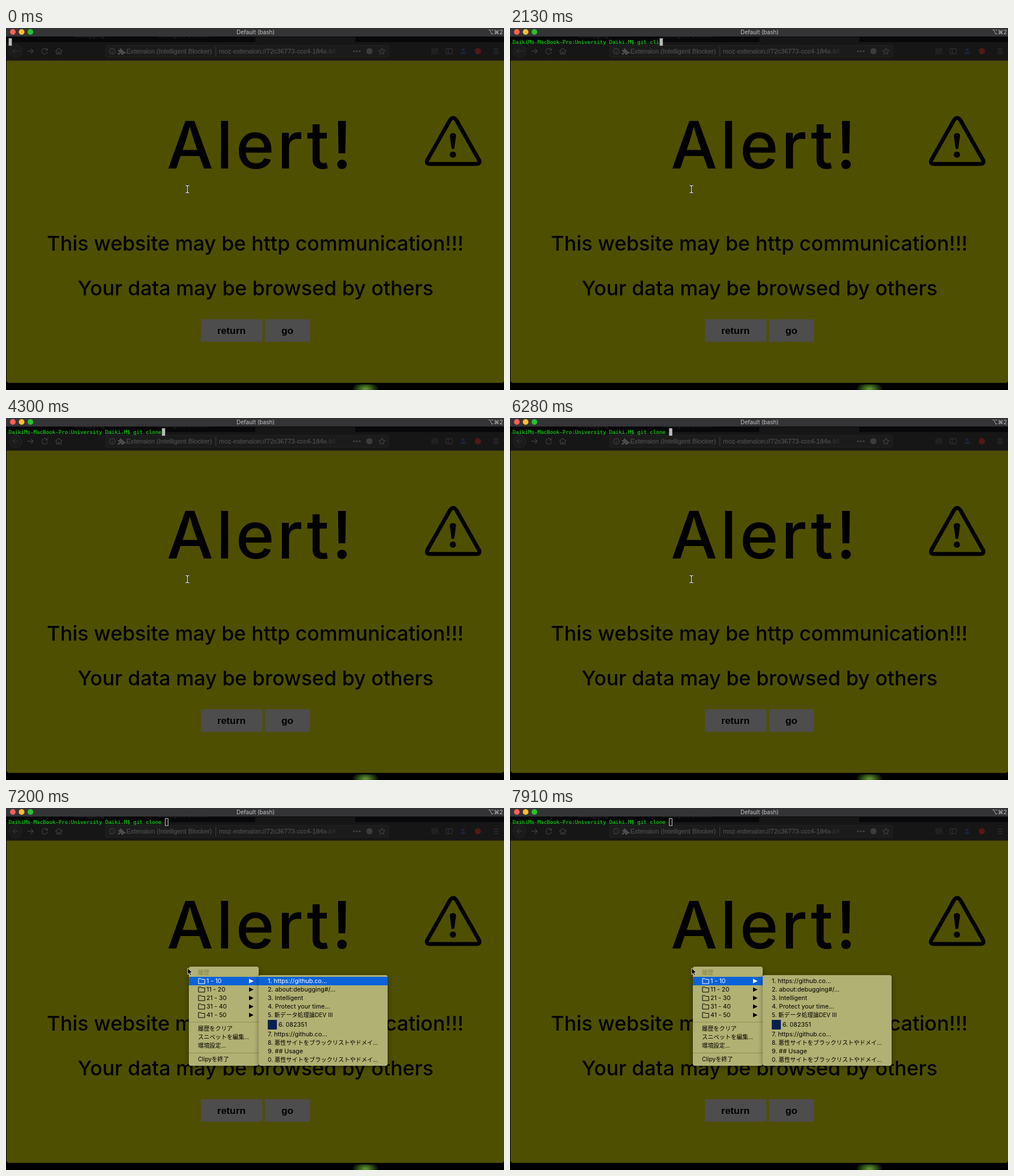
An HTML page that plays this animation: 877x639 px, repeating every 8000 ms.

```html
<!DOCTYPE html>
<html lang="en">
<head>
<meta charset="utf-8">
<title>Terminal over warning page</title>
<style>
  html, body { margin: 0; width: 100%; height: 100%; overflow: hidden; background: #000; }
  svg { display: block; width: 100%; height: 100%; }
  text { white-space: pre; }
  .page { font-family: Inter, sans-serif; font-weight: 500; font-optical-sizing: none; text-anchor: middle; }
  .button { font: bold 17.3px "Liberation Sans", sans-serif; text-anchor: middle; }
  .bar { font: 11.4px "Liberation Sans", sans-serif; fill: #4c4c4e; stroke: #4c4c4e; stroke-width: .3; }
  .tab { fill: #242426; stroke: none; }
  .icon { fill: none; stroke: #3c3c3e; stroke-width: 1.3; stroke-linecap: round; stroke-linejoin: round; }
  .faint { stroke: #2e2e30; }
  .title { font: 10px Inter, sans-serif; fill: #c4c4c4; }
  .shell { font: 9.15px "DejaVu Sans Mono", monospace; fill: #10c810; stroke: #10c810; stroke-width: .2; }
  .menu { font: 10.8px Inter, "Noto Sans CJK JP", "Noto Sans CJK", sans-serif; }
  .menu .ja { font-size: 10.2px; }
  .panel { fill: #b1b173; filter: drop-shadow(0 2px 4px rgba(0, 0, 0, .4)); }
</style>
</head>
<body>
<svg viewBox="0 0 877 639" xmlns="http://www.w3.org/2000/svg">
  <defs>
    <radialGradient id="glow">
      <stop offset="0" stop-color="#6a9a3c"/>
      <stop offset=".5" stop-color="#2f5216"/>
      <stop offset="1" stop-color="#000"/>
    </radialGradient>
    <linearGradient id="fade">
      <stop offset="0" stop-color="#1b1b1c" stop-opacity="0"/>
      <stop offset="1" stop-color="#1b1b1c"/>
    </linearGradient>
  </defs>

  <!-- dimmed browser -->
  <rect width="877" height="639" fill="#000"/>
  <ellipse cx="633" cy="637" rx="24" ry="13" fill="url(#glow)"/>
  <rect x="1" y="14" width="876" height="12" fill="#08080a"/>
  <text class="bar tab" x="120" y="17">debugging</text>
  <text class="bar tab" x="268" y="17">Intelligent Blocker</text>
  <rect x="439" y="16" width="176" height="10" fill="#161617"/>
  <rect x="1" y="25" width="876" height="33" fill="#161617"/>
  <rect x="1" y="620" width="876" height="9" fill="#000"/>
  <path d="M1 57.500H877V622q0 4.500-5 4.500H6q-5 0-5-4.500z" fill="#4f4f00"/>

  <rect x="175.500" y="30.500" width="498" height="21" rx="2" fill="#1b1b1c" stroke="#222224"/>
  <circle cx="17" cy="41" r="11.500" fill="#1b1b1c" stroke="#242426"/>
  <g class="icon">
    <path class="faint" d="M22 41H12m4-4-4 4 4 4"/>
    <path d="M38 41h10m-4-4 4 4-4 4"/>
    <path d="M72 38a5 5 0 1 0 1 4M73 36v3h-3"/>
    <path d="M87 41l6-5 6 5M89 41v5h3v-3h2v3h3v-5"/>
    <circle cx="187" cy="41" r="5"/>
    <path d="M187 40.500v3M187 38v.1M369.500 34v15"/>
    <path d="M662 35.500l1.700 3.600 4 .5-3 2.700.8 4-3.500-2-3.500 2 .8-4-3-2.700 4-.5z"/>
    <path class="faint" d="M750.500 36v10M753.500 36v10M756.500 36v10M758.500 36l3 10"/>
    <rect class="faint" x="775" y="36.500" width="11" height="9" rx="1"/>
    <path class="faint" d="M779 37v8M859 37h8M859 41h8M859 45h8"/>
  </g>
  <path d="M197 39h3v-1a2 2 0 1 1 4 0v1h3v3h1a1.800 1.800 0 1 1 0 3h-1v2h-4v-1a1.500 1.500 0 0 0-3 0v1h-3v-3h1a1.500 1.500 0 0 0 0-3h-1z" fill="#4c4c4e"/>
  <text class="bar" x="212" y="45">Extension (Intelligent Blocker)</text>
  <text class="bar" x="375" y="45">moz-extension://72c36773-ccc4-184a-b8</text>
  <rect x="555" y="33" width="32" height="16" fill="url(#fade)"/>
  <g fill="#4c4c4e">
    <circle cx="613" cy="41" r="1.500"/><circle cx="618" cy="41" r="1.500"/><circle cx="623" cy="41" r="1.500"/>
    <circle cx="640" cy="41" r="5.500" fill="#3c3c3e"/>
  </g>
  <g fill="#1a2438"><circle cx="805" cy="38.500" r="2.800"/><path d="M800 46q0-4 5-4t5 4z"/></g>
  <circle cx="831" cy="41" r="5.500" fill="#541816"/>

  <text class="page" x="283" y="248" font-size="116" letter-spacing="5" style="text-anchor:start">Alert!</text>
  <text class="page" x="439" y="392.500" font-size="35.800">This website may be http communication!!!</text>
  <text class="page" x="439.500" y="471.500" font-size="35.800">Your data may be browsed by others</text>
  <path d="M782 162.500Q787.500 155 793 162.500L833 233Q836 240 828 240H747Q739 240 742 233z" fill="none" stroke="#000" stroke-width="7"/>
  <path d="M781.500 190q0-4.500 5.500-4.500t5.500 4.500l-3 22.500q-2.500 2.500-5 0z"/>
  <circle cx="787" cy="223.500" r="5.500"/>
  <g fill="#4d4d4d" stroke="#4e4e3e">
    <rect x="343.500" y="514.500" width="108" height="39"/>
    <rect x="456.500" y="514.500" width="78.500" height="39"/>
  </g>
  <text class="button" x="397" y="540">return</text>
  <text class="button" x="495.500" y="540">go</text>

  <!-- terminal window -->
  <rect width="877" height="15" fill="#343436"/>
  <circle cx="12" cy="7" r="5" fill="#ff5f57"/>
  <circle cx="27.500" cy="7" r="5" fill="#febc2e"/>
  <circle cx="43" cy="7" r="5" fill="#28c131"/>
  <text class="title" x="439.500" y="10.800" text-anchor="middle">Default (bash)</text>
  <text class="title" x="875" y="10.800" text-anchor="end" style="font-family:Inter,'DejaVu Sans',sans-serif">⌥⌘2</text>
  <text class="shell" id="line" x="4.500" y="28"></text>
  <rect id="caret" y="18.500" width="5" height="12.500"/>

  <g id="ibeam" fill="none" transform="translate(-.5)">
    <path d="M317 278q3 0 3 2 0-2 3-2M320 280v9M317 291q3 0 3-2 0 2 3 2" stroke="#222" stroke-width="2.800"/>
    <path d="M317 278q3 0 3 2 0-2 3-2M320 280v9M317 291q3 0 3-2 0 2 3 2" stroke="#e4e4dc" stroke-width="1.300"/>
  </g>
  <g class="menu" id="mainMenu"></g>
  <g class="menu" id="subMenu"></g>
  <path id="arrow" d="M320 282.500v11.500l2.600-2.400 1.900 4.300 2-.9-1.900-4.200h3.600z" stroke="#e8e8e8" stroke-width=".9"/>
</svg>

<script>
const LOOP = 8000, CELL = 5.509, LEFT = 4.5;
const PROMPT = "DaikiMs-MacBook-Pro:University Daiki.M$ ";
const $ = id => document.getElementById(id);

// [time, text after the prompt]
const typing = [
  [90, ""], [920, "g"], [1020, "gi"], [1130, "git"], [1300, "git "],
  [1480, "git c"], [1690, "git cl"], [2130, "git cli"], [2340, "git clin"],
  [2430, "git cline"], [3060, "git clin"], [3150, "git cli"], [3320, "git cl"],
  [3860, "git clo"], [4210, "git clon"], [4300, "git clone"], [6280, "git clone "]
];
const MENU_OPEN = 6820, FOCUS_LOST = 6910, FOLDER_PICKED = 6990, SUB_OPEN = 7200;
const subSelection = [[SUB_OPEN, 0], [7460, 1], [7730, 0], [7910, -1]];

const label = (x, middle, text, extra = "") =>
  `<text x="${x}" y="${middle + 3.8}" ${/[^\x00-\x7f]/.test(text) ? 'class="ja"' : ""} ${extra}>${text}</text>`;
const panel = (x, y, w, h) => `<rect class="panel" x="${x}" y="${y}" width="${w}" height="${h}" rx="3.5"/>`;
const highlight = (id, x, w) => `<rect id="${id}" x="${x}" y="298" width="${w}" height="15" fill="#0c62d8"/>`;
const separator = y => `<path d="M322 ${y}H445" stroke="#8d8d58" stroke-width="1.2"/>`;

const folder = (name, i) => {
  const y = 305.5 + 15 * i;
  return `<g id="folder${i}">
    <path d="M339 ${y + 4.5}v-9h4l1 1.500h6v7.500z" fill="none" stroke="currentColor"/>
    ${label(353, y, name, 'fill="currentColor"')}
    <path d="M428 ${y - 4}l8 4-8 4z" fill="currentColor"/></g>`;
};

$("mainMenu").innerHTML = panel(322, 280, 123, 175) + highlight("mainMark", 322, 123)
  + label(338, 290, "履歴", 'fill="#7f7f4b"')
  + ["1 - 10", "11 - 20", "21 - 30", "31 - 40", "41 - 50"].map(folder).join("")
  + separator(378) + label(338, 389.5, "履歴をクリア") + label(338, 404.5, "スニペットを編集...")
  + label(338, 419.5, "環境設定...") + separator(432.5) + label(338, 443.5, "Clipyを終了");

const history = [
  "1. https://github.co...", "2. about:debugging#/...", "3. Intelligent",
  "4. Protect your time...", "5. 新データ処理論DEV III", "6. 082351",
  "7. https://github.co...", "8. 悪性サイトをブラックリストやドメイ...",
  "9. ## Usage", "0. 悪性サイトをブラックリストやドメイ..."
];
const historyY = i => 305.5 + 15 * i + (i === 5 ? 2 : i > 5 ? 3.5 : 0);
$("subMenu").innerHTML = panel(445, 295, 227, 160) + highlight("subMark", 445, 227)
  + '<rect x="461" y="374" width="16" height="17" fill="#0a2052"/>'
  + history.map((text, i) => label(i === 5 ? 480 : 461, historyY(i), text, `id="entry${i}"`)).join("");

const show = (id, on) => $(id).style.display = on ? "" : "none";
const latest = (steps, t) => steps.filter(([time]) => time <= t).at(-1)?.[1];

function draw(t) {
  const typed = latest(typing, t);
  const line = typed === undefined ? "" : PROMPT + typed;
  $("line").textContent = line;

  const hollow = t >= FOCUS_LOST;
  const caret = $("caret");
  caret.setAttribute("x", LEFT + line.length * CELL + .5);
  caret.setAttribute("fill", hollow ? "none" : "#bdbdbd");
  caret.setAttribute("stroke", hollow ? "#c4c4c4" : "#bdbdbd");
  caret.setAttribute("stroke-width", hollow ? 1 : .6);

  const open = t >= MENU_OPEN, picked = t >= FOLDER_PICKED;
  show("ibeam", !open);
  show("arrow", open);
  show("mainMenu", open);
  show("mainMark", picked);
  $("folder0").style.color = picked ? "#fff" : "#000";

  const selected = latest(subSelection, t) ?? -1;
  show("subMenu", t >= SUB_OPEN);
  show("subMark", selected >= 0);
  $("subMark").setAttribute("y", 298 + 15 * Math.max(selected, 0));
  for (const i of [0, 1]) $("entry" + i).setAttribute("fill", i === selected ? "#fff" : "#000");
}

const start = performance.now();
function tick() {
  draw((performance.now() - start) % LOOP);
  requestAnimationFrame(tick);
}
tick();
</script>
</body>
</html>
```
